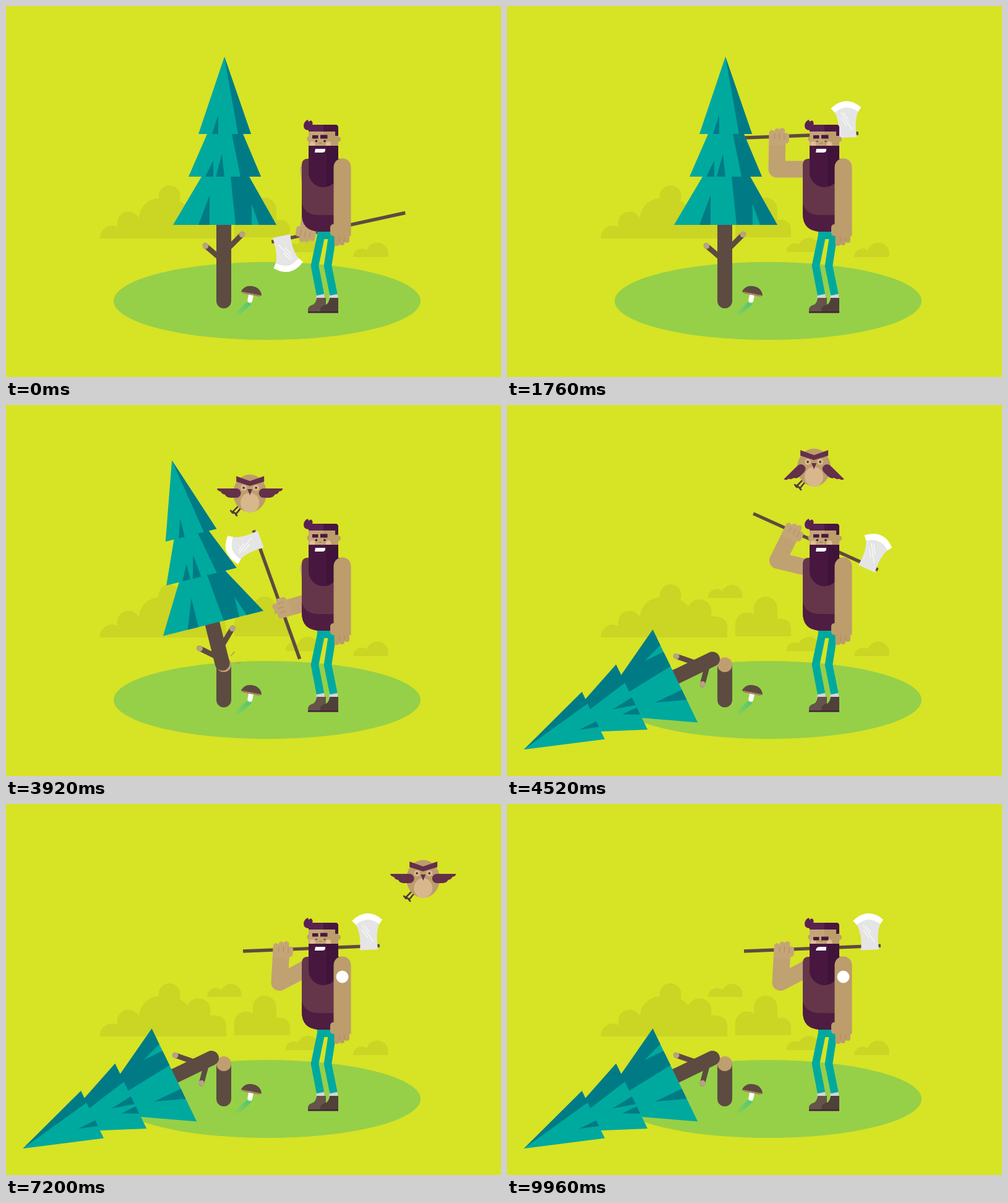
An HTML page for the animation above (10000 ms loop, 800 by 600 pixels).

```html
<!DOCTYPE html>
<html lang="en">
<head>
<meta charset="utf-8">
<title>Lumberjack</title>
<style>
html, body { margin: 0; width: 100%; height: 100%; overflow: hidden; background: #d7e325; }
svg { display: block; width: 100vw; height: 100vh; }
.cloud { fill: #cad524; }
.teal { fill: #00a99e; }
.deep { fill: #007b86; }
.bark { fill: #5d4a41; }
.skin { fill: #bc9d6b; }
.pale { fill: #c4a577; }
.plum { fill: #64304a; }
.dark { fill: #481740; }
.line { fill: none; stroke-linecap: round; stroke-linejoin: round; }
</style>
</head>
<body>
<svg viewBox="0 0 800 600" xmlns="http://www.w3.org/2000/svg">
  <defs>
    <linearGradient id="shade" gradientUnits="userSpaceOnUse" x1="391" y1="480" x2="369" y2="502">
      <stop stop-color="#3cc48a" stop-opacity=".75"/>
      <stop offset="1" stop-color="#3cc48a" stop-opacity="0"/>
    </linearGradient>
    <path id="wing" class="plum" d="M4-8H35Q35-4 29-3Q28 1 22 2Q21 6 14 7H4A7.500 7.500 0 0 1 4-8Z"/>
  </defs>
  <rect width="800" height="600" fill="#d7e325"/>

  <g class="cloud">
    <path d="M152 376A19 19 0 0 1 181 358A18 18 0 0 1 215 344A33 33 0 0 1 247 311A17.500 17.500 0 1 1 280 315Q288 319 293 326A18 18 0 0 1 329 342Q356 340 356 360V376Z"/>
    <path d="M369 374V356A19 19 0 0 1 399 339V329A19 19 0 0 1 437 329V346Q459 344 459 363V374Z"/>
    <path d="M325 312A14 14 0 0 1 348 301A17 17 0 0 1 380 312Z"/>
    <path d="M452 398A13 13 0 0 1 472 386A17 17 0 0 1 504 398Z"/>
    <path d="M561 406A14 14 0 0 1 583 395A17 17 0 0 1 617 406Z"/>
  </g>
  <ellipse cx="422" cy="477" rx="248" ry="63" fill="#96d048"/>

  <g id="axe">
    <rect class="bark" y="-2.700" width="221" height="5.400"/>
    <path fill="#e5e5e6" d="M189 6H218Q215-24 223-37Q203-48 183-37Q192-22 189 6Z"/>
    <path fill="#fff" d="M178-42Q203-64 227-42L222-35Q203-50 184-35Z"/>
    <path class="line" stroke="#fff" d="M194-34L211-7M198-34L206-22M194-26L202-14"/>
  </g>
  <path id="arm" class="line" stroke="#c0a171" stroke-width="27"/>
  <g id="hand" class="pale">
    <path d="M-13.500 14V-3H13.500V14Z"/>
    <rect x="-13.500" y="-10" width="9" height="18" rx="4.500"/>
    <rect x="-5" y="-13" width="9" height="20" rx="4.500"/>
    <rect x="3" y="-14" width="9" height="20" rx="4.500"/>
    <rect x="10" y="-6" width="9" height="17" rx="4.500"/>
    <path class="line" stroke="#a48658" stroke-width=".8" d="M-4.500-4V4M3.500-5V4M11-4V5"/>
  </g>

  <g id="owl">
    <path class="line" stroke="#4f3540" stroke-width="2.600" d="M-19 21L-29 31M-14 23L-23 34M-31 28L-27 32M-25 31L-21 36"/>
    <ellipse class="skin" rx="27" ry="30.500"/>
    <ellipse cy="15" rx="15" ry="16" fill="#d8b78d"/>
    <circle cx="-10" cy="-9" r="5" fill="#d8b78d"/>
    <circle cx="10" cy="-9" r="5" fill="#d8b78d"/>
    <circle cx="-10" cy="-9" r="1.700" fill="#3c1838"/>
    <circle cx="10" cy="-9" r="1.700" fill="#3c1838"/>
    <path class="plum" d="M-22-28L0-20L23-28V-19L0-12L-22-19ZM-4-7H4L0 3Z"/>
    <use id="wingR" href="#wing"/>
    <use id="wingL" href="#wing"/>
  </g>

  <path class="bark" d="M340 420H364V477A12 12 0 0 1 340 477Z"/>
  <circle id="cut" cx="352" cy="420" r="12" fill="#bf9f70"/>
  <g id="tree">
    <path class="bark" d="M340 350H364V420A12 12 0 0 1 340 420Z"/>
    <path class="line" stroke="#5d4a41" stroke-width="8.500" d="M346 408L322 387.500M357 394L382 369"/>
    <circle cx="322.500" cy="388" r="4.800" fill="#b9a189"/>
    <circle cx="381.500" cy="369.500" r="4.800" fill="#b9a189"/>
    <path class="teal" d="M353 82L396 207H383L412 276H393L437 354H270L316 276H295L325 207H311Z"/>
    <path class="deep" d="M353 82L396 207H375ZM365 207H383L412 276H379ZM363 276H393L437 354H409L397 320V354H371ZM343 176V207H333ZM349 239L353 276H339ZM335 250V276H322ZM329 306V354H311Z"/>
  </g>
  <g id="chips" fill="#bf9f50">
    <path d="M-4 4L3-4L4-2L-2 4Z"/>
    <path d="M-5 1L4-2L5 0L-3 2Z"/>
  </g>

  <path fill="url(#shade)" d="M389 479L397 482L376 501L367 500Z"/>
  <g transform="translate(397 462) rotate(11)">
    <path class="line" stroke="#fff" stroke-width="8" d="M0 5V14"/>
    <path class="bark" d="M-17 3Q-13-9 0-9Q13-9 17 3Z"/>
    <path fill="#a97f57" d="M-17 3H17Q15 5.500 12 5.500H-12Q-15 5.500-17 3Z"/>
  </g>

  <path fill="#d6d6d8" d="M502 464H514L515 475H501ZM523 464H535L537 475H522Z"/>
  <path class="line" style="stroke-linecap:butt;stroke-linejoin:miter" stroke="#00a99e" stroke-width="12.500" d="M511 362L499 420L508 467M529 362L520 420L529.500 467"/>
  <path class="teal" d="M503 360H532L530 377H503Z"/>
  <path fill="#66534a" d="M502 472H517V495H488V490Q489 485 496 483Q501 481 502 472Z"/>
  <path fill="#50403a" d="M523 472H537V495H508V490Q509 485 517 483Q522 481 523 472Z"/>
  <path fill="#42203c" d="M488 494H537V496.500H488Z"/>

  <path fill="#653549" d="M478 257Q478 247 488 247H545V365H505Q478 363 478 336Z"/>
  <path fill="#4f1d41" d="M478 318Q482 338 506 338H545V365H505Q478 363 478 336Z"/>

  <g class="skin">
    <circle cx="491" cy="215" r="4.500"/>
    <circle cx="536.500" cy="215.500" r="4.500"/>
    <path d="M489 200H537V230H489Z"/>
  </g>
  <path class="pale" d="M489 203H513V228H489Z"/>
  <circle cx="495" cy="223.500" r="4.500" fill="#dfbd98"/>
  <circle cx="521" cy="223.500" r="4.500" fill="#dfbd98"/>
  <path fill="#a98456" d="M505 221Q508 225 511 221Z"/>
  <g id="eyes" fill="#3c1838">
    <circle cx="501.500" r="1.800"/>
    <circle cx="515" r="1.800"/>
  </g>
  <path id="brows" class="dark" d="M495 209H504.500V214.500H495ZM508 208.500H519.500V214.500H508Z"/>
  <path fill="#5a2152" d="M489 203V201Q481 201 481 193Q482 186 488 184L489 187L493 185Q497 188 495 192H532Q537 192 537 197V203Z"/>
  <path class="dark" d="M513 192H532Q537 192 537 197V210H532V203H513Z"/>
  <path class="dark" d="M489 226H537V269A24 24 0 0 1 489 269Z"/>
  <path fill="#40133a" d="M518 226H537V269A24 24 0 0 1 518 292Z"/>
  <path id="mouth" fill="#fff"/>

  <g class="skin">
    <path d="M529.500 260.500A14 14 0 0 1 557.500 260.500V372H529.500Z"/>
    <rect x="524" y="353" width="11" height="19" rx="5"/>
    <rect x="530.500" y="362" width="8.500" height="26" rx="4"/>
    <rect x="538.500" y="362" width="8.500" height="25" rx="4"/>
    <rect x="546.500" y="360" width="8.500" height="23" rx="4"/>
  </g>
  <path class="line" stroke="#a48658" stroke-width=".8" d="M539 374V381M547 374V380"/>
  <circle id="badge" r="10" fill="#fff"/>
</svg>
<script>
const $ = id => document.getElementById(id);
const LOOP = 10000, RAD = Math.PI / 180;
const SHOULDER = [489, 264], BONE = 53;

// time, hand x, hand y, axe angle, grip distance from the butt
const swing = [
  [0, 487, 369, -192.3, 162], [450, 446, 300, -100, 112],
  [900, 437, 206, 4, 90], [1200, 437, 212, -4, 90],
  [1500, 437, 211, -2.2, 90], [2200, 437, 211, -2.2, 90],
  [2960, 450, 173.5, 0, 89], [3240, 452, 171, 5, 89],
  [3420, 440, 255, -80, 87], [3600, 476, 375, -172, 85],
  [3690, 476, 375, -172, 85], [3920, 446, 331, -110, 85],
  [4220, 444, 240, -20, 77], [4520, 461, 204, 24.3, 69],
  [4900, 444, 237, -5, 62], [5200, 445, 235.5, -2.3, 62]
];
const flight = [
  [3560, 352, 250], [3920, 394, 143], [4520, 496, 101], [5200, 568, 125],
  [6240, 608, 128], [6900, 636, 124], [7200, 674, 121], [7880, 858, 119]
];
const frown = [[9000, 0], [9200, 6]];
const pop = [[5500, 0], [5680, 1.15], [5800, 1]];
const blinks = [[1690, 1830], [7130, 7270], [8280, 8480]];
const chipSpeed = [[7, -92], [37, -42]];

// Smooth interpolation that never overshoots its keys
function sample(keys, t) {
  const last = keys.length - 1;
  if (t <= keys[0][0]) return keys[0].slice(1);
  if (t >= keys[last][0]) return keys[last].slice(1);
  const i = keys.findIndex(k => k[0] > t) - 1;
  const a = keys[i], b = keys[i + 1], span = b[0] - a[0], u = (t - a[0]) / span;
  const slope = (n, c) => n < 0 || n >= last ? 0 :
    (keys[n + 1][c] - keys[n][c]) / (keys[n + 1][0] - keys[n][0]);
  const tangent = (n, c) => {
    const p = slope(n - 1, c), q = slope(n, c);
    return p * q > 0 ? 2 * p * q / (p + q) : 0;
  };
  return a.slice(1).map((v, j) => {
    const c = j + 1, s = u * u * (3 - 2 * u);
    return v + (b[c] - v) * s + span * u * (1 - u) *
      ((1 - u) * tangent(i, c) - u * tangent(i + 1, c));
  });
}

const place = (node, value) => node.setAttribute('transform', value);
const show = (node, on) => node.setAttribute('visibility', on ? 'visible' : 'hidden');

function drawArm(t) {
  const [x, y, angle, grip] = sample(swing, t);
  const bx = x - grip * Math.cos(angle * RAD), by = y - grip * Math.sin(angle * RAD);
  place($('axe'), `translate(${bx} ${by}) rotate(${angle})`);

  const [sx, sy] = SHOULDER, dx = x - sx, dy = y - sy, dist = Math.hypot(dx, dy);
  const bend = Math.sqrt(Math.max(0, BONE * BONE - dist * dist / 4)) / dist;
  const ex = sx + dx / 2 + dy * bend, ey = sy + dy / 2 - dx * bend;
  const turn = Math.atan2(y - ey, x - ex);
  const wx = x - 12 * Math.cos(turn), wy = y - 12 * Math.sin(turn);
  $('arm').setAttribute('d', `M${sx} ${sy}L${ex} ${ey}L${wx} ${wy}`);
  place($('hand'), `translate(${x} ${y}) rotate(${turn / RAD + 90})`);
}

function drawTree(t) {
  const end = 115.8;
  let lean = 0;
  if (t >= 4480) lean = end;
  else if (t >= 4240) lean = end - 5 * Math.sin(Math.PI * (t - 4240) / 240);
  else if (t > 3800) lean = end * ((t - 3800) / 440) ** 1.63;
  const lift = 10 * Math.sin(lean * RAD);
  place($('tree'), `translate(${-20 * lean / end} ${-lift}) rotate(${-lean} 352 420)`);
  show($('cut'), lean > 0);

  const s = (t - 3620) / 1000;
  show($('chips'), s > 0 && s < .53);
  $('chips').setAttribute('opacity', Math.min(1, Math.max(0, (.53 - s) * 6)));
  chipSpeed.forEach(([vx, vy], i) => place($('chips').children[i],
    `translate(${364 + vx * s} ${416 + vy * s + 150 * s * s}) rotate(${(s - .3) * 300})`));
}

function drawOwl(t) {
  const [x, y] = sample(flight, t);
  const flap = 22.5 * (1 - Math.cos(2 * Math.PI * (t - 3920) / 410));
  show($('owl'), t > 3560 && t < 7880);
  place($('owl'), `translate(${x} ${y})`);
  place($('wingR'), `translate(18 0) rotate(${flap})`);
  place($('wingL'), `translate(-18 0) scale(-1 1) rotate(${flap})`);
}

function drawFace(t) {
  const shut = blinks.some(([a, b]) => t >= a && t <= b);
  place($('eyes'), `translate(0 ${shut ? 219 : 218.5}) scale(1 ${shut ? .35 : 1})`);
  place($('brows'), `translate(0 ${sample(frown, t)[0]})`);
  $('mouth').setAttribute('d', t < 9080
    ? 'M500 231H516V233Q516 237 511 237H499Z'
    : 'M499 237Q500 231 505 231H516L515.500 237Z');
  place($('badge'), `translate(543.500 279.500) scale(${sample(pop, t)[0]})`);
}

const start = performance.now();
function frame() {
  const t = (performance.now() - start) % LOOP;
  drawArm(t);
  drawTree(t);
  drawOwl(t);
  drawFace(t);
  requestAnimationFrame(frame);
}
frame();
</script>
</body>
</html>
```
